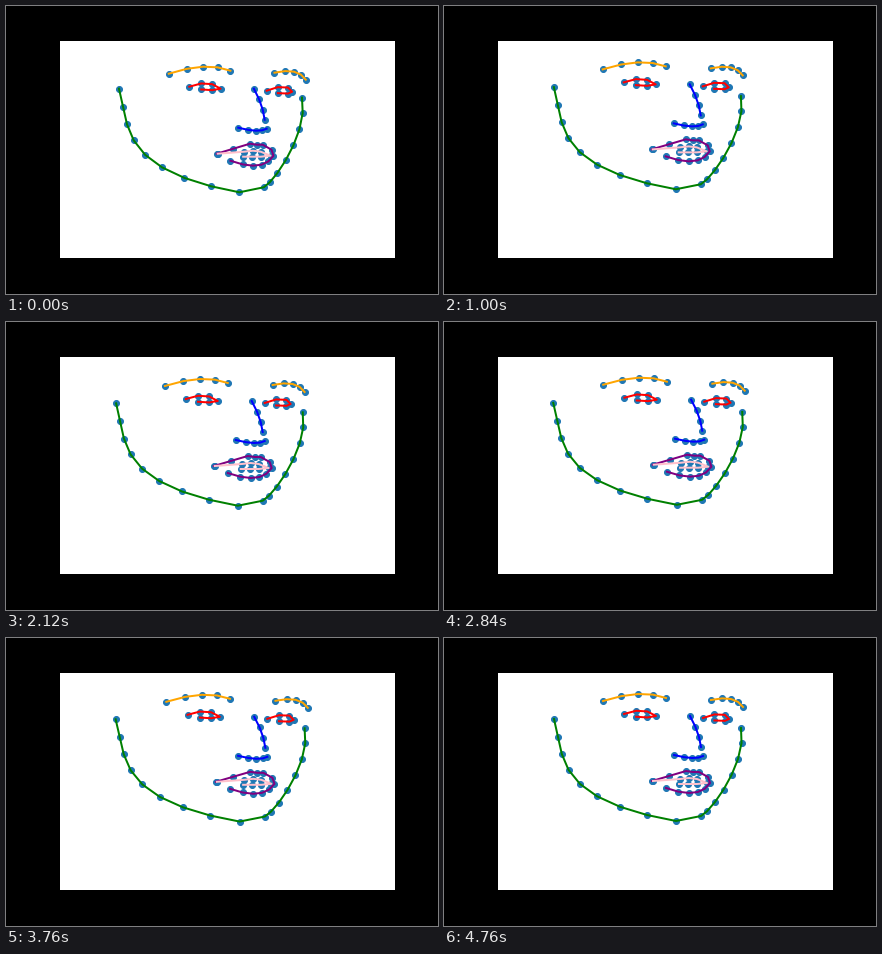
These frames come from a looping animation (432x288 px, 4800 ms). A matplotlib script:

```python
import numpy as np
import matplotlib.pyplot as plt
from matplotlib.animation import FuncAnimation
from matplotlib.patches import Rectangle

W, H, DPI = 432, 288, 72
FRAMES, STEP = 120, 40
CENTER_X, HALF_WIDTH = 204, 94

# Head motion: time in ms, turn (x shift), nod (y shift), spread (widening).
MOTION = np.array([
    (0, 2.8, 4.7, -2),
    (480, 0.5, 1.1, -1),
    (900, 0, 0, 0),
    (1520, -1.8, 2.3, 0.2),
    (2120, -0.2, 1, -0.2),
    (2840, 0.7, -0.3, 1),
    (3760, 1.8, 0.8, 1),
    (4200, 0.7, -0.3, 1),
    (4760, 0, 0, 0),
])


def curve(*keys):
    """Evenly indexed points on the polynomial through (index, x, y) keys."""
    i, x, y = np.array(keys, float).T
    steps = np.arange(i[-1] + 1)
    return np.column_stack([np.polyval(np.polyfit(i, v, len(i) - 1), steps)
                            for v in (x, y)])


def eye(left, right, near, far):
    """Two corners with an upper and a lower lid between them."""
    u = np.array([0, near, far, 1, far, near])[:, None]
    pts = np.array(left) + u * np.subtract(right, left)
    pts[1:3, 1] -= 4
    pts[4:, 1] += 2
    return pts


jaw = np.vstack([
    curve((0, 110, 81), (1, 114, 99), (4, 136, 146), (7, 203, 177),
          (8, 232, 183)),
    curve((0, 257, 178), (2, 271, 164), (5, 294, 121), (7, 297, 90)),
])
left_brow = curve((0, 159, 63), (2, 194, 56), (4, 222, 60))
right_brow = curve((0, 267, 62), (2, 287, 61), (4, 299, 69))
bridge = curve((0, 246, 78), (2, 255, 99), (3, 257, 109))
nostrils = curve((0, 230, 117), (2, 248, 120), (4, 259, 118))
left_eye = eye((180, 76), (212, 78), 0.38, 0.73)
right_eye = eye((259, 80), (285, 81), 0.44, 0.84)
lips = np.vstack([
    curve((0, 208, 143), (2, 242, 133)),
    curve((0, 249, 134), (1, 255, 134), (2, 264, 139), (3, 266, 145)),
    curve((0, 266, 145), (3, 245, 155), (5, 222, 150))[1:],
])
inner_lips = np.vstack([
    (209, 143),
    curve((0, 236, 141), (1, 245, 140), (2, 253, 141)),
    (263, 145),
    curve((0, 253, 146), (2, 235, 146)),
])

# The jaw lies further back than the features, so it follows less.
jaw_depth = 0.35 + 0.35 * np.sin(np.linspace(0, np.pi, len(jaw)))

PARTS = [
    ("green", jaw, jaw_depth),
    ("orange", left_brow, 1),
    ("orange", right_brow, 1),
    ("blue", bridge, 1),
    ("blue", nostrils, 1),
    ("red", left_eye, 1),
    ("red", right_eye, 1),
    ("purple", lips, 1),
    ("pink", inner_lips, 1),
]


def move(pts, depth, turn, nod, spread):
    x, y = pts.T
    side = (x - CENTER_X) / HALF_WIDTH
    return np.column_stack([x + turn * depth + spread * side, y + nod * depth])


fig = plt.figure(figsize=(W / DPI, H / DPI), dpi=DPI, facecolor="black")
ax = fig.add_axes([0, 0, 1, 1])
ax.set_xlim(0, W)
ax.set_ylim(H, 0)
ax.axis("off")
ax.add_patch(Rectangle((54, 35), 335, 217, color="white", lw=0, zorder=0))

dots = ax.scatter([], [], s=36, color="#1f77b4", zorder=1)
lines = [ax.plot([], [], color=color, lw=2, zorder=2)[0]
         for color, _, _ in PARTS]


def draw(frame):
    pose = [np.interp(frame * STEP, MOTION[:, 0], col)
            for col in MOTION.T[1:]]
    shapes = [move(pts, depth, *pose) for _, pts, depth in PARTS]
    dots.set_offsets(np.vstack(shapes))
    for line, pts in zip(lines, shapes):
        line.set_data(*pts.T)
    return [dots, *lines]


anim = FuncAnimation(fig, draw, frames=FRAMES, interval=STEP,
                     init_func=lambda: draw(0), repeat=True, repeat_delay=0)
plt.show()
```
